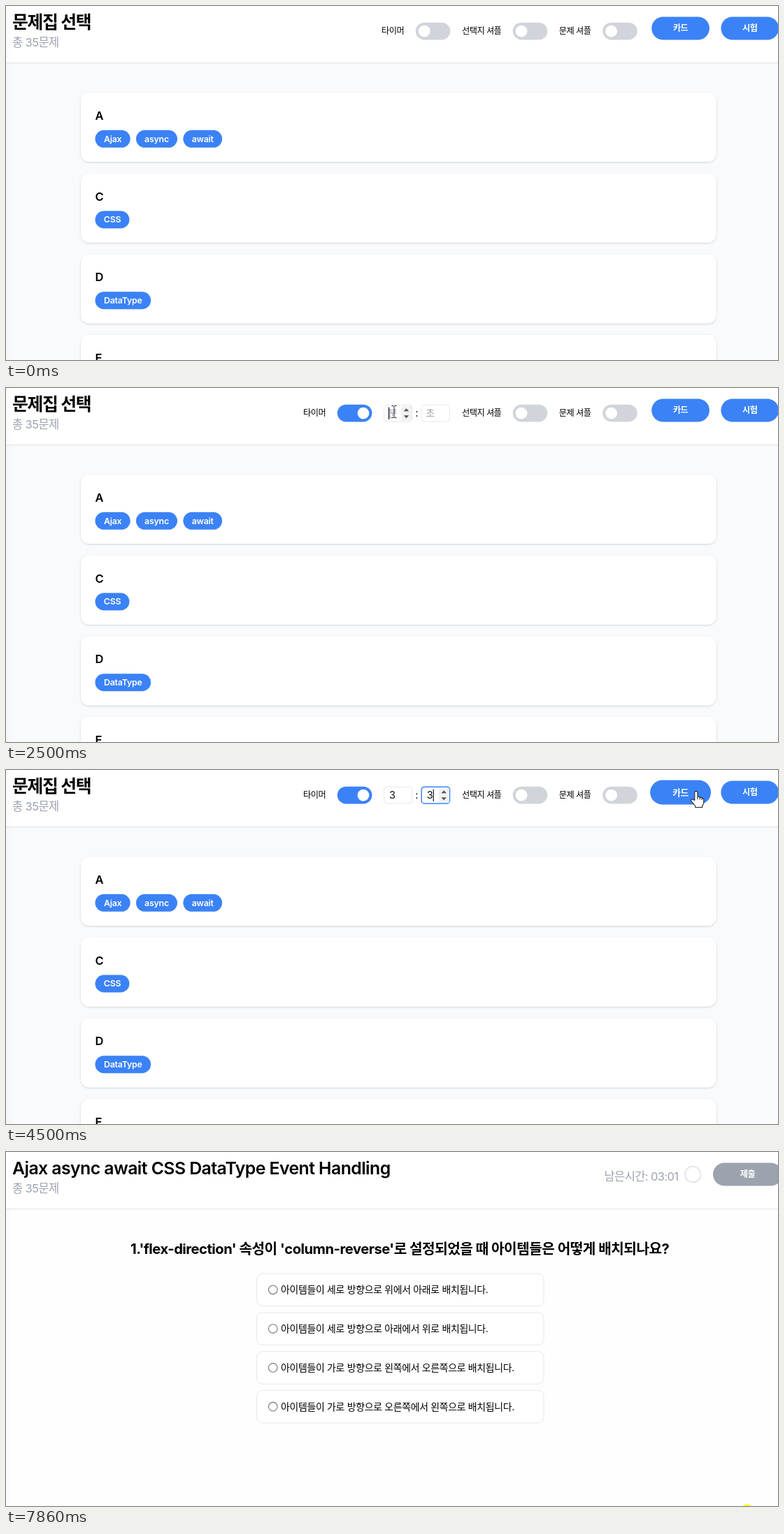
An HTML page that plays this animation: 1104 by 507 pixels, repeating every 7.93 s.

```html
<!DOCTYPE html>
<html lang="ko">
<head>
<meta charset="utf-8">
<title>문제집 선택</title>
<style>
html, body { margin: 0; width: 100%; height: 100%; overflow: hidden; background: #fff; }
svg { display: block; width: 1104px; height: 507px; }
text { font-family: Inter, "Noto Sans CJK KR", "Noto Sans CJK", sans-serif; white-space: pre; }
</style>
</head>
<body>
<svg id="stage" viewBox="0 0 1104 507" xmlns="http://www.w3.org/2000/svg">
  <defs>
    <linearGradient id="edge"><stop stop-color="#000" stop-opacity=".02"/><stop offset="1" stop-color="#000" stop-opacity="0"/></linearGradient>
    <filter id="shade" x="-5%" y="-10%" width="110%" height="125%">
      <feDropShadow dx="0" dy="1" stdDeviation="1.4" flood-opacity=".16"/>
    </filter>
    <clipPath id="slot"><rect x="470" y="15" width="170" height="45"/></clipPath>
  </defs>
  <g id="list"></g>
  <g id="quiz"></g>
  <g id="live"></g>
  <g id="pointer"></g>
</svg>
<script>
const LOOP = 7930, SWITCH = 5280;
const BLUE = '#3b82f6', GRAY = '#9ca3af', LINE = '#e5e7eb', OFF = '#d1d5db';
const $ = id => document.getElementById(id);
const clamp = v => Math.max(0, Math.min(1, v));
const mix = (a, b, p) => a + (b - a) * p;
const span = (t, from, length) => clamp((t - from) / length);

// cubic-bezier(.4, 0, .2, 1)
function ease(x) {
  let lo = 0, hi = 1;
  for (let i = 0; i < 20; i++) {
    const u = (lo + hi) / 2, v = 1 - u;
    if (1.2 * v * v * u + .6 * v * u * u + u * u * u < x) lo = u; else hi = u;
  }
  return 3 * (1 - lo) * lo * lo + lo * lo * lo;
}

function blend(a, b, p) {
  const part = (c, i) => parseInt(c.slice(i, i + 2), 16);
  return `rgb(${[1, 3, 5].map(i => Math.round(mix(part(a, i), part(b, i), p)))})`;
}

const rect = (x, y, w, h, r, fill, more = '') =>
  `<rect x="${x}" y="${y}" width="${w}" height="${h}" rx="${r}" fill="${fill}" ${more}/>`;
const text = (x, y, s, size, { weight = 400, fill = '#000', gap = 0, anchor = 'start' } = {}) =>
  `<text x="${x}" y="${y}" font-size="${size}" font-weight="${weight}" fill="${fill}" letter-spacing="${gap}" text-anchor="${anchor}">${s}</text>`;

const header = (title, gap) =>
  rect(0, 0, 1104, 82, 0, '#fff') + rect(0, 81, 1104, 1.2, 0, LINE) +
  text(9, 32, title, 24.8, { weight: 600, gap }) +
  text(9, 58, '총 35문제', 16.5, { fill: GRAY, gap: -.6 });

function card([name, ...tags], i) {
  const y = 124 + i * 115.7;
  let x = 127.5;
  let out = rect(107, y, 908.5, 99, 12, '#fff', 'filter="url(#shade)"') +
    text(127.6, y + 39, name, 16.5, { weight: 600 });
  for (const [label, w] of tags) {
    out += rect(x, y + 53.8, w, 25, 12.5, BLUE) +
      text(x + w / 2, y + 70.6, label, 12.4, { weight: 600, fill: '#fff', gap: -.25, anchor: 'middle' });
    x += w + 8.3;
  }
  return out;
}

function option(label, i) {
  const y = 174.2 + i * 55.8;
  return rect(358.5, y, 410.6, 46.4, 8, '#fff', `stroke="${LINE}"`) +
    `<circle cx="381.8" cy="${y + 23.1}" r="6.3" fill="#fff" stroke="#767676" stroke-width="1.1"/>` +
    text(393, y + 27.9, label, 13.9, { gap: -.29 });
}

$('list').innerHTML = rect(0, 0, 1104, 507, 0, '#f9fafb') + header('문제집 선택', -1.35) +
  [['A', ['Ajax', 50.2], ['async', 59], ['await', 55.8]], ['C', ['CSS', 49]],
   ['D', ['DataType', 79.6]], ['E']].map(card).join('') +
  rect(0, 0, 12, 507, 0, 'url(#edge)');

$('quiz').innerHTML = rect(0, 0, 1104, 507, 0, '#fefefe') +
  header('Ajax async await CSS DataType Event Handling', -.56) +
  text(563.2, 145.5, "1.'flex-direction' 속성이 'column-reverse'로 설정되었을 때 아이템들은 어떻게 배치되나요?",
    20.2, { weight: 700, gap: -.5, anchor: 'middle' }) +
  ['세로 방향으로 위에서 아래로', '세로 방향으로 아래에서 위로',
   '가로 방향으로 왼쪽에서 오른쪽으로', '가로 방향으로 오른쪽에서 왼쪽으로']
    .map(s => `아이템들이 ${s} 배치됩니다.`).map(option).join('') +
  `<circle cx="982.2" cy="32" r="11.3" fill="none" stroke="${LINE}" stroke-width="2"/>` +
  rect(1011, 15.5, 99, 33, 16.5, GRAY) +
  text(1060.5, 36.3, '제출', 12.2, { weight: 600, fill: '#fff', gap: -.5, anchor: 'middle' }) +
  rect(0, 82, 8, 425, 0, 'url(#edge)');

const label = (x, s) => text(x, 40, s, 12.2, { weight: 500, gap: -.5 });

const toggle = (x, p) => rect(x, 23.7, 49.6, 24.8, 12.4, blend(OFF, BLUE, p)) +
  `<circle cx="${x + 12.4 + 24.8 * p}" cy="36.1" r="8.4" fill="#fff"/>`;

function button(cx, s, p) {
  const k = 1 + .05 * p;
  return `<g transform="translate(${cx} 32) scale(${k})">` + rect(-41.4, -16.6, 82.8, 33.2, 16.6, BLUE) +
    text(0, 4.3, s, 12.2, { weight: 600, fill: '#fff', gap: -.5, anchor: 'middle' }) + '</g>';
}

function field(x, { hint, value, focus, spin, up, caret }) {
  let out = rect(x + .5, 24.2, 40.3, 23.8, 4, '#fff',
    `stroke="${blend(LINE, BLUE, focus)}" stroke-width="${1 + .5 * focus}"`);
  out += value ? text(x + 8, 41.3, value, 14.5, { fill: '#111' })
    : text(x + 6.5, 41, hint, 14, { fill: GRAY });
  if (spin) {
    out += rect(x + 25, 26, 15, 20.5, 0, '#f1f1f1');
    if (up) out += rect(x + 25, 26, 15, 10.2, 0, '#c6c6c6');
    out += `<path d="M${x + 28.8} 33.3l3.7-4 3.7 4zM${x + 28.8} 39.3l3.7 4 3.7-4z" fill="#505050"/>`;
  }
  if (caret) out += rect(x + (value ? 17 : 7), 27.5, 1.1, 17.5, 0, '#000');
  return out;
}

// time, x, y
const path = [
  [190, 1059, 512], [420, 985, 260], [700, 690, 30], [860, 600, 38], [990, 610, 38],
  [1090, 610, 38], [1360, 613, 42], [1440, 616, 43], [1660, 653, 45], [1880, 617, 31], [1910, 616, 31],
  [2100, 555, 34], [2500, 555, 34], [2880, 553, 34], [3060, 553, 34], [3280, 620, 29],
  [3520, 620, 29], [3620, 606, 35], [3880, 606, 35], [4310, 945, 54], [4340, 947, 53],
  [4500, 987, 30], [4720, 990, 30], [5120, 1085, 27], [5290, 1085, 27], [5870, 969, 286],
  [7250, 969, 286], [7550, 1059, 513]
];

function place(t) {
  let i = 0;
  while (i < path.length - 2 && t >= path[i + 1][0]) i++;
  const [ta, xa, ya] = path[i], [tb, xb, yb] = path[i + 1];
  const u = span(t, ta, tb - ta), p = t < 700 ? u : u * u * (3 - 2 * u);
  return [mix(xa, xb, p), mix(ya, yb, p)];
}

const shapes = {
  arrow: '<path d="M.5 .5V17L4.3 13.4 6.9 19.4 9.4 18.3 6.9 12.5H12Z" fill="#fff" stroke="#444" stroke-width="1"/>',
  hand: '<path d="M-2.2 13V2Q-2 .4-.1 .4T2 2V8.5Q4.6 7.3 5.3 9.4 7.6 8.6 8.2 10.6 10.8 10 10.8 13V17Q10.6 19.5 8.8 21V23.5H-1.2V21.5L-7.2 14.3Q-7.8 10.6-4.2 12.2L-2.2 14M2 8.5V12M5.3 9.4V12.6M8.2 10.6V13" fill="#fff" stroke="#222" stroke-width="1.1" stroke-linejoin="round"/>',
  beam: '<path d="M-3.5-8.5H-1L0-7.5 1-8.5H3.5M0-7.5V7.5M-3.5 8.5H-1L0 7.5 1 8.5H3.5" fill="none" stroke="#222" stroke-width="1"/>'
};

function render(t) {
  const quiz = t >= SWITCH;
  $('list').style.display = quiz ? 'none' : '';
  $('quiz').style.display = quiz ? '' : 'none';
  const [x, y] = place(t);
  let kind = 'arrow';

  if (quiz) {
    const left = 3 - (t >= 6260) - (t >= 7260);
    $('live').innerHTML = text(961.3, 41.3, `남은시간: 03:0${left}`, 16.5, { fill: GRAY, gap: -.62, anchor: 'end' }) +
      (t >= 7860 ? '<circle cx="1059.5" cy="512.8" r="8.4" fill="#ff0"/>' : '');
  } else {
    const open = ease(span(t, 1380, 500)), shift = 112 * open;
    const on = ease(span(t, 1380, 150));
    const fx = 652 - shift;
    const over = (a, b, top = 24, bottom = 48) => x >= a && x < b && y >= top && y < bottom;
    const inA = t > 1900 && over(fx, fx + 41), inB = t > 1900 && over(fx + 53.7, fx + 95);
    const spinHit = over(fx + 25, fx + 41) || over(fx + 79, fx + 95);
    const focusA = t >= 2500 && t < 3620, focusB = t >= 3620 && t < 5200;
    const hoverA = ease(span(t, 4350, 150)) - ease(span(t, 4850, 150));
    const hoverB = ease(span(t, 4900, 150));

    if ((inA || inB) && !spinHit) kind = 'beam';
    if (over(586 - shift, 635.6 - shift) || over(923, 1006, 15, 49) || over(1022, 1105, 15, 49)) kind = 'hand';

    const fields = field(fx, {
      hint: '분', value: t >= 2700 ? '3' : '', focus: ease(span(t, 2500, 150)) - ease(span(t, 3620, 150)),
      spin: inA || focusA, caret: focusA
    }) + text(fx + 47.4, 41, ':', 15, { fill: '#111', anchor: 'middle' }) + field(fx + 53.7, {
      hint: '초', value: t >= 4050 ? '3' : '', focus: ease(span(t, 3620, 150)) - ease(span(t, 5200, 150)),
      spin: inB || focusB, up: inB && spinHit && y < 36, caret: focusB && !(t >= 4550 && t < 5050)
    });
    $('live').innerHTML = label(537 - shift, '타이머') + toggle(585.8 - shift, on) +
      (open ? `<g clip-path="url(#slot)" opacity="${open}">${fields}</g>` : '') +
      label(652, '선택지 셔플') + toggle(724.7, 0) + label(790.8, '문제 셔플') + toggle(853.2, 0) +
      button(964.6, '카드', hoverA) + button(1063.8, '시험', hoverB);
  }

  const seen = t >= 200 && t < 7540;
  $('pointer').innerHTML = seen ? `<g transform="translate(${x} ${y})">${shapes[kind]}</g>` : '';
}

const start = performance.now();
function frame(now) {
  render(Math.max(0, now - start) % LOOP);
  requestAnimationFrame(frame);
}
render(0);
requestAnimationFrame(frame);
</script>
</body>
</html>
```
